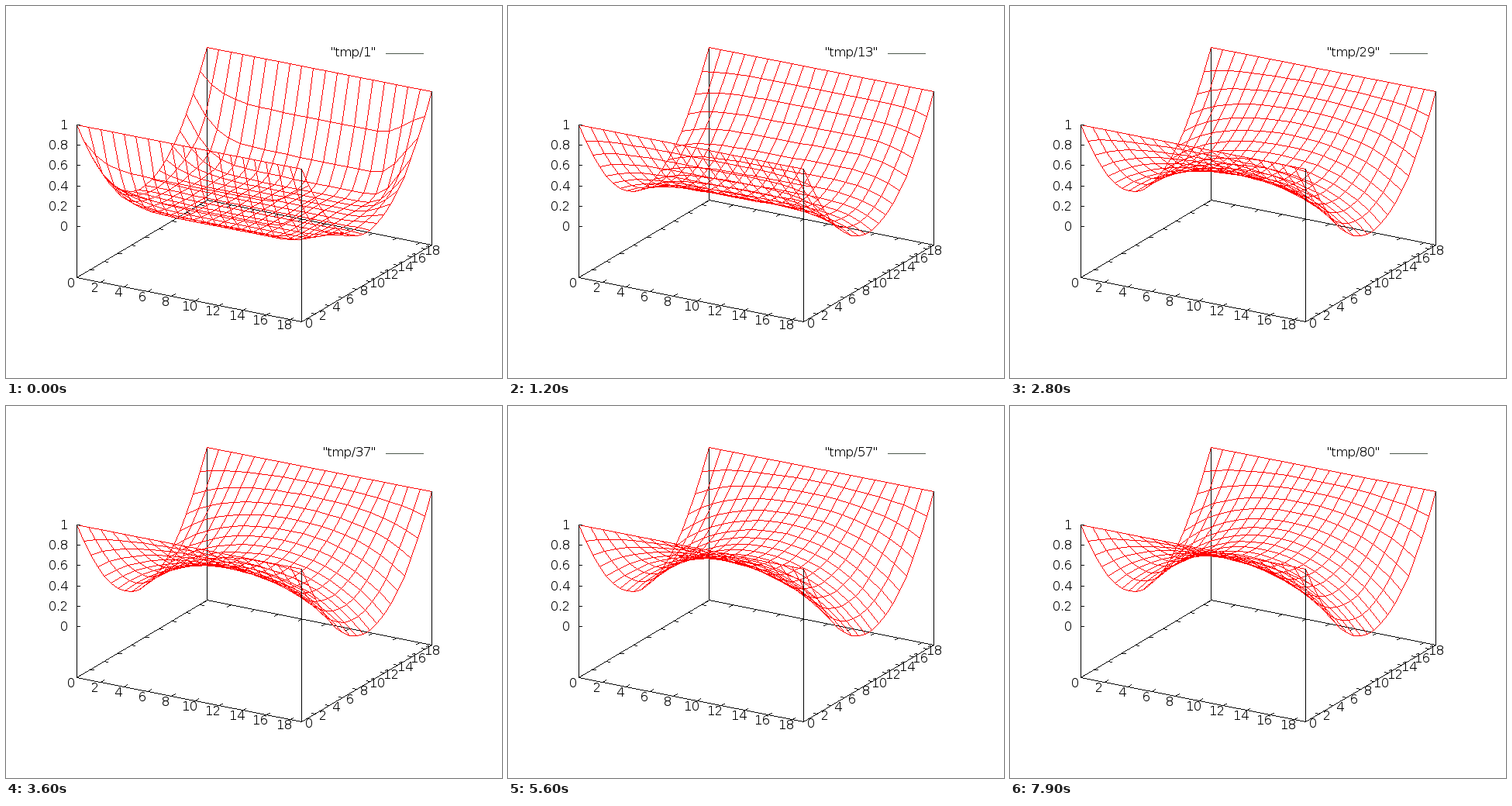
These frames come from a looping animation (640 px wide and 480 px high, 8 s). A matplotlib script:

```python
import numpy as np
import matplotlib.pyplot as plt
from matplotlib.animation import FuncAnimation

W, H, DPI = 640, 480, 100
N = 20              # grid points per side
LAST = N - 1
FRAMES = 80
FLOOR = -0.5
BLACK, RED, GREY = (0, 0, 0), (255, 0, 0), (77, 89, 77)

plt.rcParams["text.hinting"] = "default"
plt.rcParams["text.hinting_factor"] = 1


def project(x, y, z):
    """Oblique view of the box, z = FLOOR being its bottom."""
    sx = 91 + (290 * x + 168 * y) / LAST
    sy = 350 + (57.2 * x - 99.6 * y) / LAST - 131.6 * (z - FLOOR)
    return np.stack([sx, sy], axis=-1)


def sweep(u):
    """One in-place Gauss-Seidel pass of the Laplace equation."""
    for i in range(1, LAST):
        for j in range(1, LAST):
            u[i, j] = (u[i - 1, j] + u[i + 1, j] + u[i, j - 1] + u[i, j + 1]) / 4


def solve():
    u = np.zeros((N, N))
    u[[0, -1], :] = (2 * np.arange(N) / LAST - 1) ** 2
    u[:, [0, -1]] = 1
    sweep(u)
    states = []
    for _ in range(FRAMES):
        sweep(u)
        sweep(u)
        states.append(u.copy())
    return states


def mesh(u):
    p = project(*np.mgrid[:N, :N], u)
    along_x = np.stack([p[:-1], p[1:]], axis=2).reshape(-1, 2, 2)
    along_y = np.stack([p[:, :-1], p[:, 1:]], axis=2).reshape(-1, 2, 2)
    return np.concatenate([along_x, along_y])


def stroke(img, segs, color):
    """Hard one-pixel lines, stepping along the longer direction."""
    segs = np.floor(np.asarray(segs, float) + 0.5)
    a, d = segs[:, 0], segs[:, 1] - segs[:, 0]
    steps = np.maximum(np.abs(d).max(axis=1), 1)
    t = np.minimum(np.arange(steps.max() + 1) / steps[:, None], 1)
    p = a[:, None] + d[:, None] * t[..., None]
    px = np.floor(p + 0.5).astype(int)
    img[px[..., 1], px[..., 0]] = color


fig = plt.figure(figsize=(W / DPI, H / DPI), dpi=DPI, facecolor="white")
ax = fig.add_axes([0, 0, 1, 1])


def label(x, base, s, ha="center"):
    return ax.text(round(x), round(base), s, ha=ha, va="baseline",
                   family="DejaVu Sans", size=16 * 72 / DPI, color="black")


def edge(a, b):
    return [project(*a), project(*b)]


back = [edge((0, LAST, FLOOR), (0, LAST, 1)),
        edge((0, 0, FLOOR), (0, LAST, FLOOR)),
        edge((0, LAST, FLOOR), (LAST, LAST, FLOOR))]
front = [edge((0, 0, FLOOR), (0, 0, 1)),
         edge((LAST, 0, FLOOR), (LAST, 0, 1)),
         edge((LAST, LAST, FLOOR), (LAST, LAST, 1)),
         edge((0, 0, FLOOR), (LAST, 0, FLOOR)),
         edge((LAST, 0, FLOOR), (LAST, LAST, FLOOR))]

# ticks point into the box, along the other floor axis
TX, TY = 0.3, 0.5
for k in range(0, N, 2):
    front.append(edge((k, 0, FLOOR), (k, TY, FLOOR)))
    back.append(edge((k, LAST, FLOOR), (k, LAST - TY, FLOOR)))
    front.append(edge((LAST, k, FLOOR), (LAST - TX, k, FLOOR)))
    back.append(edge((0, k, FLOOR), (TX, k, FLOOR)))
    x, y = project(k, 0, FLOOR)
    label(x - 7, y + 13, str(k))
    x, y = project(LAST, k, FLOOR)
    label(x + 10, y + 8, str(k))

for k in range(6):
    x, y = project(0, 0, k / 5)
    front.append([(x, y), (x + 4, y)])
    label(80, y + 6, f"{k / 5:g}", "right")

title = label(477, 65, "", "right")
states = solve()


def render(u):
    img = np.full((H, W, 3), 255, np.uint8)
    stroke(img, back, BLACK)
    stroke(img, mesh(u), RED)
    stroke(img, front, BLACK)
    stroke(img, [[(490, 61), (538, 61)]], GREY)
    return img


plot = ax.imshow(render(states[0]), extent=(0, W, H, 0), aspect="auto",
                 interpolation="nearest")
ax.set_xlim(0, W)
ax.set_ylim(H, 0)
ax.axis("off")


def draw(i):
    plot.set_data(render(states[i]))
    title.set_text(f'"tmp/{i + 1}"')
    return plot, title


anim = FuncAnimation(fig, draw, frames=FRAMES, interval=100, repeat=True,
                     repeat_delay=0, blit=False)
plt.show()
```
